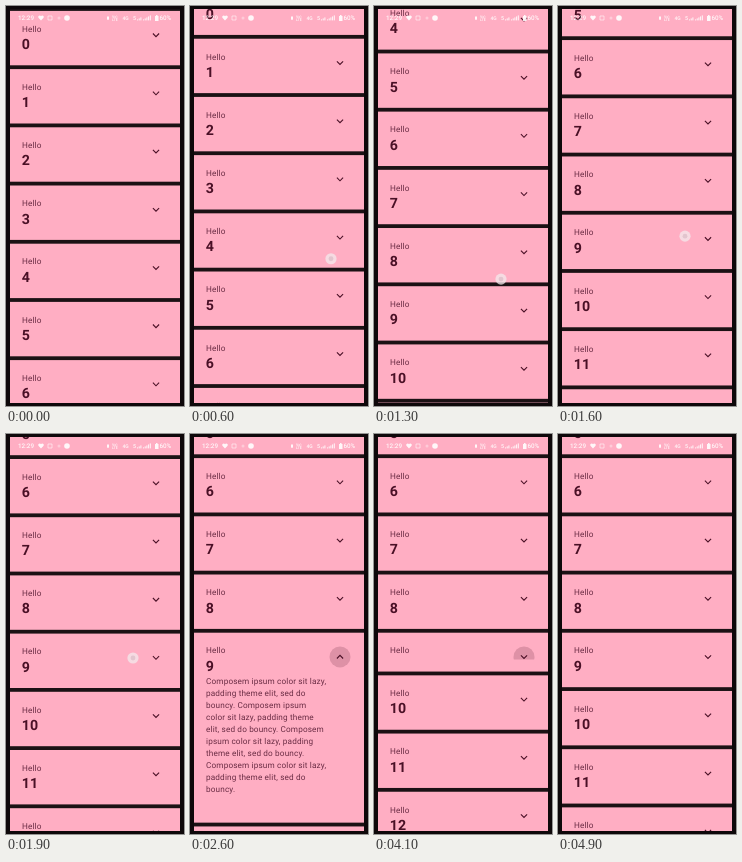
An HTML page that plays this animation: 178x400 px, repeating every 5000 ms.

```html
<!DOCTYPE html>
<html lang="en">
<head>
<meta charset="utf-8">
<title>Expanding greeting list</title>
<style>
  html, body { margin: 0; width: 100%; height: 100%; overflow: hidden; background: #000; }
  svg { display: block; width: 100vw; height: 100vh; font-family: Roboto, sans-serif; text-rendering: geometricPrecision; }
  .card { fill: #ffaec3; }
  .label { font-size: 8.2px; letter-spacing: .15px; fill: #6a2c44; }
  .number { font-size: 14.2px; font-weight: 700; fill: #4a1026; }
  .chevron { fill: none; stroke: #4a1026; stroke-width: 1.1; }
  .status { fill: #fff; font-size: 6.3px; font-weight: 500; opacity: .9; }
</style>
</head>
<body>
<svg viewBox="0 0 178 400">
  <defs>
    <clipPath id="screen"><rect x="4" y="3" width="170" height="394"/></clipPath>
    <clipPath id="content"><rect id="contentRect" x="4" y="12" width="170"/></clipPath>
  </defs>
  <rect width="178" height="400" fill="#0e080a"/>
  <g clip-path="url(#screen)">
    <rect x="4" y="3" width="170" height="394" fill="#1b1114"/>
    <g id="list"></g>
    <g class="status">
      <text x="12" y="14.4">12:29</text>
      <path d="M35 14.4l-2.6-2.7a1.4 1.4 0 0 1 2.6-1.4a1.4 1.4 0 0 1 2.6 1.4z"/>
      <path d="M42 10h4v4h-4z" fill="none" stroke="#fff" stroke-width=".8" opacity=".75"/>
      <circle cx="53" cy="12" r="1.5" opacity=".4"/>
      <circle cx="61" cy="12" r="2.8"/>
      <rect x="101" y="10.5" width="2" height="3.2"/>
      <g font-size="3.6">
        <text x="106" y="11.8">Vo)</text><text x="106" y="15">LTE</text>
      </g>
      <text x="116.5" y="14.2" font-size="5">4G</text>
      <text x="127" y="14.3" font-size="5.4">5</text>
      <g id="signal"></g>
      <path d="M149 10h1v-1h1.5v1h1v5h-3.5z"/>
      <text x="153.4" y="14.4">60%</text>
    </g>
    <g id="touch">
      <circle r="5.6" fill="#f3eaed"/>
      <circle r="2.4" fill="#d9cdd2"/>
    </g>
  </g>
</svg>
<script>
const LOOP = 5000, STEP = 100;
const PITCH = 58.2, CARD_HEIGHT = 54.4, PADDING = 12, FIRST_TOP = 4.9;
const CARD_COUNT = 14, ACTIVE = 9, BODY_HEIGHT = 120;
const TAP_LENGTH = 85, OPEN_TAP = 2300, CLOSE_TAP = 3800;
const OPEN_AT = OPEN_TAP + TAP_LENGTH, CLOSE_AT = CLOSE_TAP + TAP_LENGTH;
const ICON = { x: 150, y: 24.2 };
const CHEVRON_DOWN = "M-3.1-1.6L0 1.5L3.1-1.6", CHEVRON_UP = "M-3.1 1.6L0-1.5L3.1 1.6";

const BODY = [
  "Composem ipsum color sit lazy,", "padding theme elit, sed do",
  "bouncy. Composem ipsum", "color sit lazy, padding theme",
  "elit, sed do bouncy. Composem", "ipsum color sit lazy, padding",
  "theme elit, sed do bouncy.", "Composem ipsum color sit lazy,",
  "padding theme elit, sed do", "bouncy."
];

const FLINGS = [
  { start: 500, distance: 215, tau: 152 },
  { start: 1176, distance: 115, tau: 100 }
];
const tap = start => ({ start, end: start + TAP_LENGTH, x: ICON.x, from: 223, to: 223 });
const TOUCHES = [
  { start: 500, end: 800, x: 141, from: 340, to: 216 },
  { start: 1200, end: 1900, x: 127, from: 302, to: 224 },
  tap(OPEN_TAP), tap(CLOSE_TAP)
];

const byId = id => document.getElementById(id);
const clamp = v => Math.min(1, Math.max(0, v));

// Speeds up, then glides to rest.
function glide({ start, distance, tau }, t) {
  const x = Math.max(0, t - start) / tau;
  return distance * (1 - (1 + x) * Math.exp(-x));
}

// Medium-bouncy spring: damping ratio 0.5, stiffness 200.
function spring(ms) {
  if (ms <= 0) return 0;
  const s = ms / 1000, decay = Math.sqrt(200) / 2, w = decay * Math.sqrt(3);
  return 1 - Math.exp(-decay * s) * (Math.cos(w * s) + decay / w * Math.sin(w * s));
}

function cardMarkup(i) {
  const active = i === ACTIVE;
  const body = BODY.map((line, n) =>
    `<text class="label" x="16" y="${51 + n * 12.03}">${line}</text>`).join("");
  return `<g>
    <rect class="card" x="4" width="170" height="${CARD_HEIGHT}"/>
    <g ${active ? 'clip-path="url(#content)"' : ""}>
      ${active ? `<circle id="ripple" cx="${ICON.x}" cy="${ICON.y}" fill="#4a1026"/>` : ""}
      <text class="label" x="16" y="20.8">Hello</text>
      <text class="number" x="15.8" y="38.1">${i}</text>
      ${active ? `<g id="body">${body}</g>` : ""}
      <path class="chevron" transform="translate(${ICON.x} ${ICON.y})" d="${CHEVRON_DOWN}"/>
    </g>
  </g>`;
}

function signalBars(x, count) {
  return Array.from({ length: count }, (_, i) => {
    const height = 1 + i;
    return `<rect x="${x + i * 1.7}" y="${14.4 - height}" width="1" height="${height}"/>`;
  }).join("");
}

byId("signal").innerHTML = signalBars(131, 3) + signalBars(137, 5);
byId("list").innerHTML = Array.from({ length: CARD_COUNT }, (_, i) => cardMarkup(i)).join("");
const cards = [...byId("list").children];
const activeRect = cards[ACTIVE].querySelector(".card");
const activeChevron = cards[ACTIVE].querySelector(".chevron");

function drawRipple(t) {
  const age = t - (t < CLOSE_TAP ? OPEN_TAP : CLOSE_TAP);
  byId("ripple").setAttribute("r", age < 0 ? 0 : 4 + 6.5 * clamp(age / 200));
  byId("ripple").setAttribute("opacity", .18 * clamp((500 - age) / 200));
}

function drawTouch(t) {
  const touch = TOUCHES.findLast(({ start }) => t >= start);
  byId("touch").style.display = touch ? "" : "none";
  if (!touch) return;
  const { start, end, x, from, to } = touch;
  const left = 1 - clamp((t - start) / (end - start));
  byId("touch").setAttribute("transform", `translate(${x} ${to + (from - to) * left ** 3})`);
  byId("touch").setAttribute("opacity", .75 * clamp(1 - (t - end) / 130));
}

function draw(t) {
  const scroll = FLINGS.reduce((sum, fling) => sum + glide(fling, t), 0);
  const extra = BODY_HEIGHT * (spring(t - OPEN_AT) - spring(t - CLOSE_AT));
  const open = t >= OPEN_AT && t < CLOSE_AT;

  cards.forEach((card, i) => {
    const y = FIRST_TOP + i * PITCH - scroll + (i > ACTIVE ? extra : 0);
    card.setAttribute("transform", `translate(0 ${y.toFixed(2)})`);
  });
  activeRect.setAttribute("height", CARD_HEIGHT + extra);
  byId("contentRect").setAttribute("height", CARD_HEIGHT - 2 * PADDING + extra);
  byId("body").style.display = open ? "" : "none";
  activeChevron.setAttribute("d", open ? CHEVRON_UP : CHEVRON_DOWN);

  drawRipple(t);
  drawTouch(t);
}

const start = performance.now();
function tick() {
  const t = (performance.now() - start) % LOOP;
  draw(Math.floor(t / STEP) * STEP);
  requestAnimationFrame(tick);
}
tick();
</script>
</body>
</html>
```
